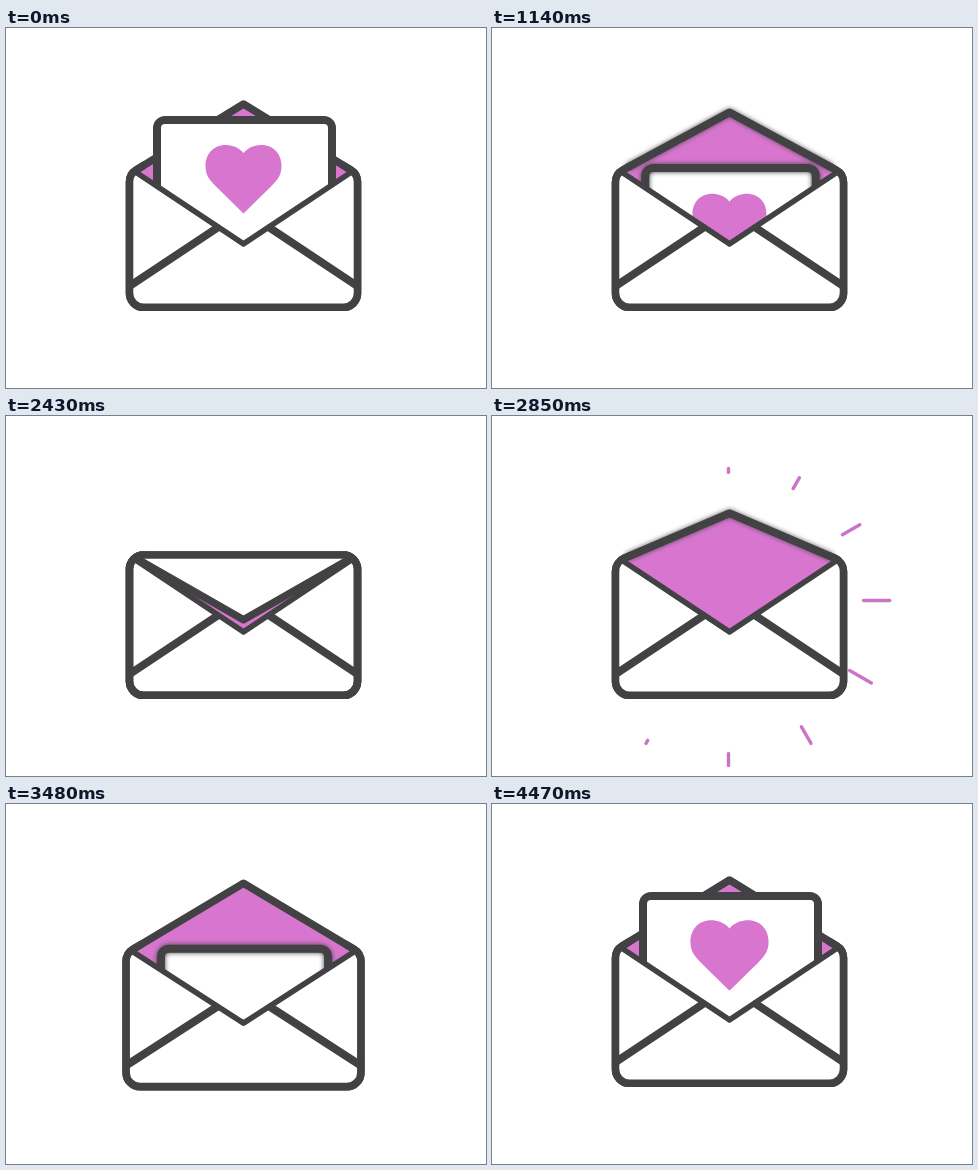
An HTML page with a canvas that plays this animation: 480x360 px, repeating every 4.5 s.

```html
<!DOCTYPE html>
<html lang="en">
<head>
<meta charset="utf-8">
<title>Love letter</title>
<style>
  html, body { margin: 0; width: 100%; height: 100%; overflow: hidden; background: #fff; }
  canvas { display: block; }
</style>
</head>
<body>
<canvas id="stage" width="480" height="360"></canvas>
<script>
const ctx = document.getElementById('stage').getContext('2d');
const LOOP = 4500, INK = '#424143', PINK = '#d876cf', RAY = '#cb74c6';
const CX = 237.5, HALF = 114, FLOOR = 279.3, HINGE = 143;

// Value at time t through [time, value] pairs, eased between neighbours.
function key(t, ...keys) {
  if (t <= keys[0][0]) return keys[0][1];
  for (let i = 1; i < keys.length; i++) {
    const [t0, a] = keys[i - 1], [t1, b] = keys[i];
    if (t < t1) return a + (b - a) * (1 - Math.cos(Math.PI * (t - t0) / (t1 - t0))) / 2;
  }
  return keys[keys.length - 1][1];
}

const flapAngle = t => key(t, [1020, 180], [1480, 0], [2100, 0], [3240, 180]) * Math.PI / 180;
const letterTop = t => key(t, [600, 88], [980, 46], [1070, 46], [1210, 222],
  [3280, 222], [3660, 73], [3900, 83], [4200, 88]);

function stroke(width, color = INK) {
  ctx.lineWidth = width;
  ctx.strokeStyle = color;
  ctx.stroke();
}

function fill(color) {
  ctx.fillStyle = color;
  ctx.fill();
}

function softStroke(width, blur) {
  ctx.shadowColor = INK;
  ctx.shadowBlur = blur;
  stroke(width);
  ctx.shadowBlur = 0;
}

function drawHeart(x, y, scale) {
  ctx.save();
  ctx.translate(x, y);
  ctx.scale(scale, scale);
  ctx.translate(0, -17.5);
  ctx.beginPath();
  for (const side of [-1, 1]) {
    ctx.moveTo(0, 0);
    ctx.bezierCurveTo(side * 5, -6, side * 12, -8, side * 18, -8);
    ctx.bezierCurveTo(side * 30, -8, side * 38, 1, side * 38, 13);
    ctx.bezierCurveTo(side * 38, 22, side * 34, 27, side * 28, 33);
    ctx.lineTo(0, 60.5);
  }
  fill(PINK);
  ctx.restore();
}

function drawLetter(t) {
  const top = letterTop(t), speed = Math.abs(letterTop(t + 5) - letterTop(t - 5));
  const scale = key(t, [1070, 1], [1210, .95], [3480, .955], [3860, 1.1], [4200, 1]);
  const half = 87.5 * scale;
  ctx.beginPath();
  ctx.roundRect(CX + 1 - half, top + 4, half * 2, Math.max(130 - (top - 88), 30), 8);
  fill('#fff');
  softStroke(8, Math.min(speed, 5));
  const beat = t < 2000 ? 1 : key(t, [3500, 0], [3880, 1.43], [4590, 1]);
  const shift = t < 3720 ? top - 88 : key(t, [3720, top - 88], [3880, 0]);
  if (beat > 0) drawHeart(CX, 142.5 + shift, beat * Math.min(scale, 1));
}

function drawEnvelope(t) {
  const drop = key(t, [1380, 0], [1500, 4], [1860, 0], [3300, 0], [3520, 4], [3680, 0]);
  const flare = key(t, [3600, 0], [3870, 1], [4230, 0]);
  const at = (x, y) => {
    const up = FLOOR - y;
    return [CX + (x - CX) * (1 + drop * .008 + flare * .063 * Math.min(up / 140, 1)),
      y + drop * .9 - flare * up * (up > 140 ? .043 : .014)];
  };
  const move = (x, y) => ctx.moveTo(...at(x, y));
  const line = (x, y) => ctx.lineTo(...at(x, y));
  const turn = (x, y, toX, toY) => ctx.arcTo(...at(x, y), ...at(toX, toY), 14);
  const L = CX - HALF, R = CX + HALF;

  const angle = flapAngle(t), lift = -Math.cos(angle), open = Math.max(lift, 0);
  const tip = HINGE - lift * (lift > 0 ? 67 : 74);
  const shoulder = 139 + 7 * Math.min(open * 1.5, 1);
  const peak = lift > 0 ? Math.min(tip, 139) : 139;
  const bend = 14, bendY = shoulder + (peak - shoulder) * bend / HALF;

  // Everything but the top edge, with both shoulders rounded
  const sides = () => {
    ctx.beginPath();
    move(L + bend, bendY);
    turn(L, shoulder, L, 200);
    turn(L, FLOOR, CX, FLOOR);
    turn(R, FLOOR, R, 200);
    turn(R, shoulder, CX, peak);
    line(R - bend, bendY);
  };
  const outline = () => {
    sides();
    line(CX, peak);
    ctx.closePath();
  };

  outline();
  fill(PINK);
  const turning = Math.abs(flapAngle(t + 5) - flapAngle(t - 5));
  if (open && turning > .001) {
    ctx.beginPath();
    move(L + bend, bendY);
    line(CX, peak);
    line(R - bend, bendY);
    softStroke(7, Math.min(turning * 200, 5));
  }
  outline();
  stroke(7.6);

  if (t < 1230 || t > 3280) drawLetter(t);

  // Front pocket
  sides();
  line(R - 4, 144);
  line(CX, 215);
  line(L + 4, 144);
  fill('#fff');
  sides();
  stroke(7.6);
  ctx.beginPath();
  move(L + 1, 257.5);
  line(211, 200);
  move(R - 1, 257.5);
  line(264, 200);
  stroke(8);
  ctx.beginPath();
  move(L + 6, 144);
  line(CX, 215.8);
  line(R - 6, 144);
  stroke(5.6);

  if (lift < 0) {
    ctx.beginPath();
    move(L + 6, 142);
    line(CX, tip);
    line(R - 6, 142);
    fill('#fff');
    stroke(7.6);
    outline();
    stroke(7.6);
  }
}

// Twelve rays shoot outwards one after another, anticlockwise from the lower left.
function drawRays(t) {
  for (let i = 0; i < 12; i++) {
    const age = (t - 2531) / 38 - i;
    if (age <= 0 || age >= 7.8) continue;
    const a = (240 - i * 30) * Math.PI / 180;
    const inner = 128 + 37 * (age / 7.8) ** 2;
    const outer = 128 + 37 * Math.min(age / 3.8, 1);
    ctx.beginPath();
    for (const r of [inner, outer]) ctx.lineTo(236.5 + r * Math.sin(a), 184.5 - r * Math.cos(a));
    stroke(3.4, RAY);
  }
}

function frame(now) {
  const t = now % LOOP;
  ctx.clearRect(0, 0, 480, 360);
  ctx.lineJoin = ctx.lineCap = 'round';
  drawRays(t);
  drawEnvelope(t);
  requestAnimationFrame(frame);
}
requestAnimationFrame(frame);
</script>
</body>
</html>
```
